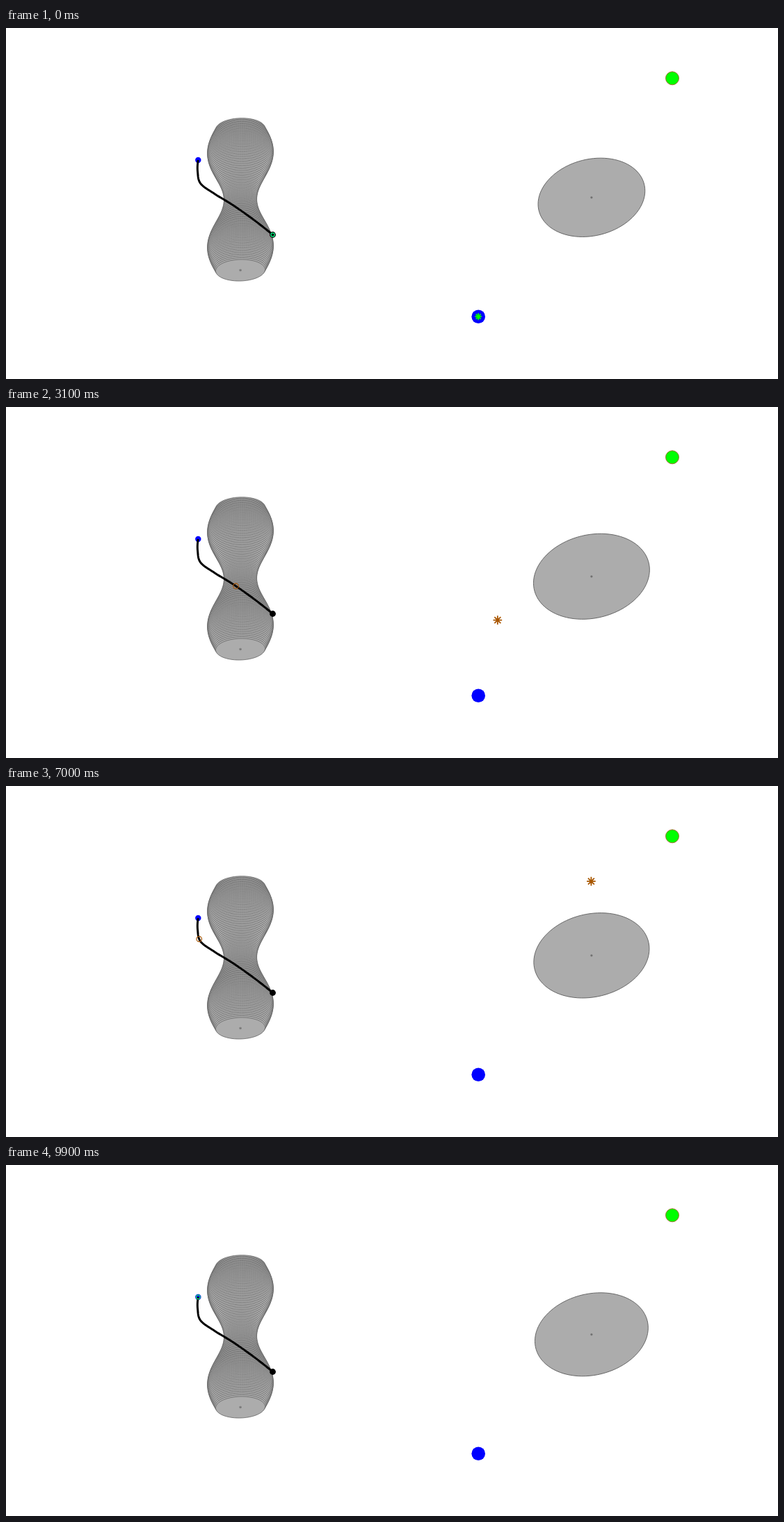
An HTML page with a canvas that plays this animation: 1110x505 px, repeating every 10000 ms.

```html
<!DOCTYPE html>
<html lang="en">
<head>
<meta charset="utf-8">
<title>Path around a tube</title>
<style>
html, body { margin: 0; width: 100%; height: 100%; overflow: hidden; background: #fff; }
canvas { display: block; }
</style>
</head>
<body>
<canvas id="stage" width="1110" height="505"></canvas>
<script>
const ctx = document.getElementById('stage').getContext('2d');
const STEP_MS = 100, STEPS = 100;
const TAU = 2 * Math.PI;

// Points passed at even time intervals: [x, y] and [x, y, heat].
const trail = smoothPath([
  [383.5, 297.5], [356.3, 276], [327, 255.3], [299.4, 238.3],
  [279.9, 223.9], [275.6, 207.5], [276.3, 190]
]);
const star = smoothPath([
  [679.2, 415.2, 0], [691, 358.5, 0.36], [710.5, 298.5, 0.67], [757, 222, 0.38],
  [824.7, 150, 0.72], [893.5, 106, 0.26], [958, 72.2, 0.1]
]);

// Catmull-Rom curve over 0..1, with parabolic continuation at both ends.
function smoothPath(points) {
  const beyond = (a, b, c) => a.map((v, n) => 3 * v - 3 * b[n] + c[n]);
  const p = [beyond(...points), ...points, beyond(...points.slice(-3).reverse())];
  const spans = points.length - 1;
  return progress => {
    const i = Math.min(Math.floor(progress * spans), spans - 1);
    const u = progress * spans - i;
    const [a, b, c, d] = p.slice(i, i + 4);
    return b.map((v, n) => v + u / 2 * (c[n] - a[n]
      + u * (2 * a[n] - 5 * v + 4 * c[n] - d[n] + u * (3 * (v - c[n]) + d[n] - a[n]))));
  };
}

function paint(fill, stroke, width) {
  if (fill) { ctx.fillStyle = fill; ctx.fill(); }
  if (stroke) { ctx.strokeStyle = stroke; ctx.lineWidth = width; ctx.stroke(); }
}

function disc(x, y, r, fill, stroke, width) {
  ctx.beginPath();
  ctx.arc(x, y, r, 0, TAU);
  paint(fill, stroke, width);
}

// Ellipse given by its half extents; skew is the correlation of x and y.
function section(x, y, rx, ry, skew, lineWidth) {
  const shift = Math.asin(skew);
  ctx.beginPath();
  for (let n = 0; n < 90; n++) {
    const angle = n * TAU / 90;
    ctx.lineTo(x + rx * Math.cos(angle), y - ry * Math.sin(angle + shift));
  }
  ctx.closePath();
  paint('#acacac', '#5c5c5c', lineWidth);
}

function asterisk(x, y, r, color, width) {
  ctx.beginPath();
  for (let n = 0; n < 8; n++) {
    ctx.moveTo(x, y);
    ctx.lineTo(x + r * Math.cos(n * TAU / 8), y + r * Math.sin(n * TAU / 8));
  }
  paint(null, color, width);
}

function drawTube() {
  const slices = 100;
  for (let n = 0; n < slices; n++) {
    const u = n / (slices - 1);
    const r = 35.5 - 11.9 * Math.cos(1.5 * Math.PI * (2 * u - 1));
    section(337, 145.2 + 203.3 * u, r, r * 0.437, 0.06, 0.75);
  }
  asterisk(337, 348.5, 1.8, '#707070', 0.8);
}

function drawTrail() {
  ctx.beginPath();
  for (let n = 0; n <= STEPS; n++) ctx.lineTo(...trail(n / STEPS));
  paint(null, '#000', 3);
}

function draw(step) {
  const progress = step / (STEPS - 1);
  const [ringX, ringY] = trail(progress);
  const [starX, starY, heat] = star(progress);
  const red = 255 * heat, green = 255 - red;
  const radius = 77.6 - 22.2 * Math.cos(TAU * (step - 50.6) / 67);

  ctx.clearRect(0, 0, 1110, 505);
  drawTube();
  disc(276.3, 190, 4.2, '#00f');
  disc(383.5, 297.5, 4.4, '#000');
  drawTrail();
  disc(ringX, ringY, 2.6 + 1.8 * heat, null, `rgb(${red},${green},${140 * (1 - heat) ** 3})`, 1.2);

  section(841.9, 243.8, radius, radius * 0.737, 13 / radius, 0.9);
  disc(841.9, 243.8, 1.6, '#707070');

  disc(679.2, 415.2, 9.8, '#00f');
  asterisk(starX, starY, 5 + 2 * heat, `rgb(${red},${green},0)`, 1.8);
  disc(958, 72.3, 9.5, '#0f0', '#a8642c', 0.9);
}

function tick() {
  draw(Math.floor(performance.now() / STEP_MS) % STEPS);
  requestAnimationFrame(tick);
}
tick();
</script>
</body>
</html>
```
